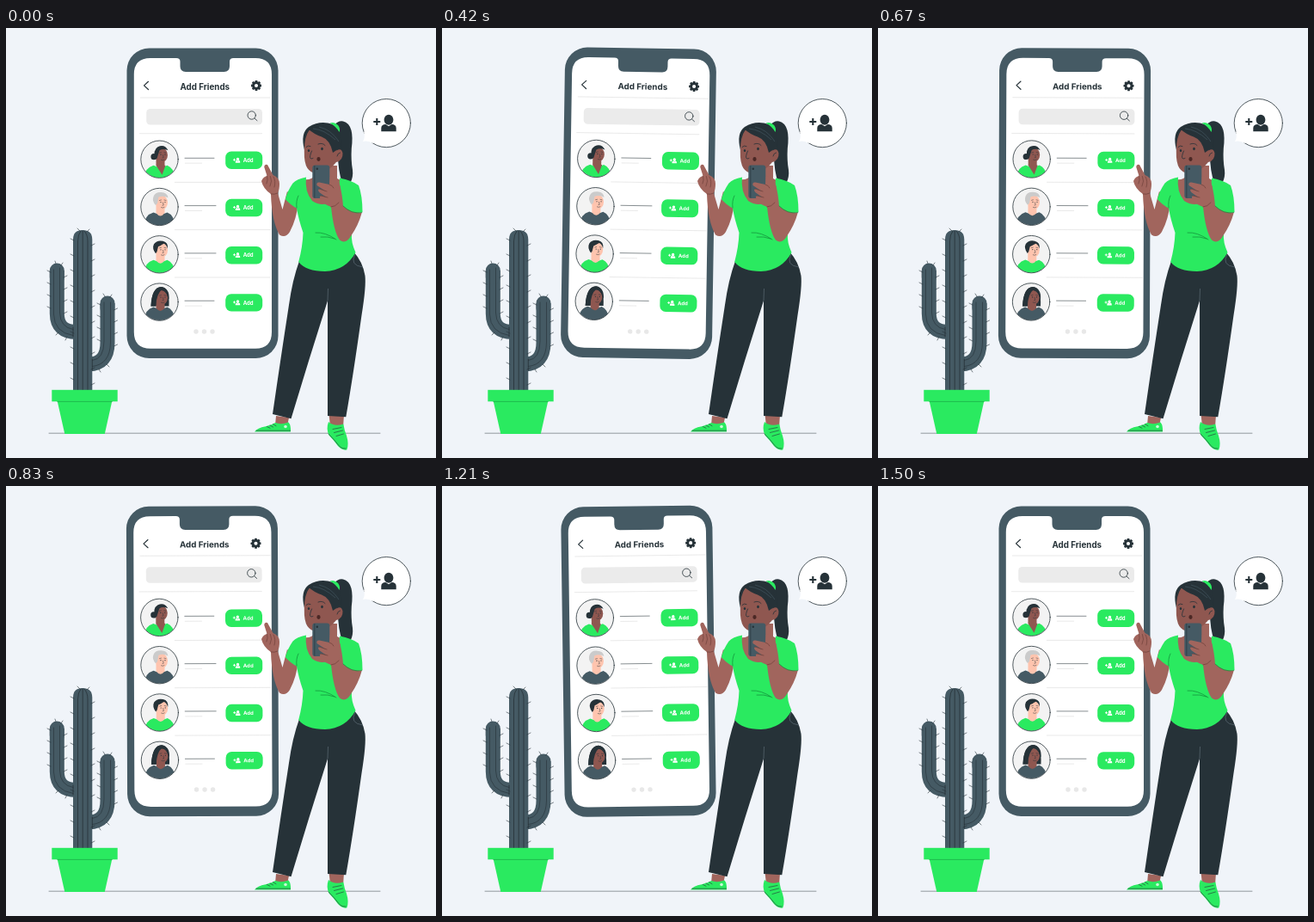
Write an HTML page that moves like this. It is 500 px wide and 500 px high and loops after 1.54 s.

```html
<!DOCTYPE html>
<html lang="en">
<head>
<meta charset="utf-8">
<title>Add Friends</title>
<style>
  html, body { margin: 0; width: 100%; height: 100%; overflow: hidden; background: #f0f4f9; }
  svg { display: block; width: 100vw; height: 100vh; }
  text { font-family: Inter, "Open Sans", sans-serif; font-weight: 700; }
  .green { fill: #2aea60; }
  .slate { fill: #455a64; }
  .dark { fill: #263238; }
  .skin { fill: #a1655d; }
  .deep { fill: #8f5750; }
  .fair { fill: #ffc4ae; }
  .ink { fill: none; stroke: #263238; stroke-width: .8; stroke-linecap: round; stroke-linejoin: round; }
  .thin { stroke-width: .6; }
  .fold { fill: none; stroke: #128a38; stroke-width: .7; stroke-linecap: round; }
  .crease { fill: none; stroke: #6f3f3a; stroke-width: .7; stroke-linecap: round; }
  .rule { stroke: #e4e4e4; stroke-width: .8; }
</style>
</head>
<body>
<svg viewBox="0 0 500 500" xmlns="http://www.w3.org/2000/svg">
  <defs>
    <clipPath id="disc"><circle r="21.4"/></clipPath>
    <g id="person">
      <ellipse cy="-4.2" rx="5.4" ry="6"/>
      <path d="M-8.7 9.3V5.500Q-8.700 1-3.500 1L0 3.200L3.500 1Q8.700 1 8.700 5.500V9.300Z"/>
    </g>
  </defs>

  <path class="ink" d="M50 471.200H435" stroke-opacity=".6"/>

  <g id="phone">
    <rect class="slate" x="140.500" y="23.500" width="176" height="360.500" rx="26"/>
    <path fill="#fff" d="M168 35H198Q202.500 35 202.500 39V44.500Q202.500 51 209 51H253.500Q260 51 260 44.500V39Q260 35 264.500 35H290Q309 35 309 54V353.500Q309 372.700 290 372.700H168Q148.800 372.700 148.800 353.500V54Q148.800 35 168 35Z"/>
    <path class="ink" style="stroke-width:1.200" d="M165.500 62.300L160.500 66.900L165.500 71.500"/>
    <text class="dark" x="231.300" y="71.500" font-size="9.800" text-anchor="middle">Add Friends</text>
    <g id="gear" class="dark" transform="translate(291 67)"></g>
    <rect x="163.200" y="94" width="134.800" height="18.600" rx="4.500" fill="#ebebeb"/>
    <circle class="ink" cx="285.700" cy="101.500" r="4.700"/>
    <path class="ink" d="M289 105L292 107.700"/>
    <g id="rows"></g>
    <g fill="#e8e8e8">
      <circle cx="221" cy="353" r="2.700"/><circle cx="230.500" cy="353" r="2.700"/><circle cx="240" cy="353" r="2.700"/>
    </g>
  </g>

  <g id="cactus">
    <path d="M59.300 282V332Q59.300 353.500 82 353.500M118 320V366Q118 390.500 96 391" fill="none" stroke="#455a64" stroke-width="17"/>
    <path d="M59.300 282V290M118 320V326" fill="none" stroke="#455a64" stroke-width="17" stroke-linecap="round"/>
    <path class="slate" d="M78 421V246Q78 235 89 235Q100.300 235 100.300 246V421Z"/>
    <path class="ink" d="M83.500 421V248Q83.500 240 87 236M89.200 421V236M95 421V248Q95 240 91 236"/>
    <path class="ink thin" d="M55.500 281V333Q56 354 78 357.500M62.500 279V331Q63 348 78 350.500M114 319V364Q114 385 100.500 386.500M121.500 319V366Q121 391 100.500 393.500"/>
    <path class="ink" d="M78 348V359M100.300 385V398"/>
    <path id="spines" class="ink thin" d=""/>
    <path class="green" d="M59.500 433H123.500L114.800 472H68.300Z"/>
    <rect class="green" x="53.300" y="420.800" width="76.400" height="13.500"/>
    <path class="fold" style="stroke-width:.5" d="M59.700 434.400H123.400"/>
  </g>

  <g id="bubble">
    <circle class="ink" style="fill:#fff" cx="442.300" cy="110.600" r="28.100"/>
    <path fill="#fff" d="M416 120.500Q418.200 127.500 414.800 132Q420 130.500 426.500 134L432 124Z"/>
    <use href="#person" class="dark" transform="translate(445 111)"/>
    <path d="M427.300 109H435.300M431.300 105V113" stroke="#263238" stroke-width="2.100"/>
  </g>

  <g id="woman">
    <path class="dark" d="M382 113Q386 107.500 392 108.500Q399 110 401.500 119Q403.500 127 401.800 140Q401 154 403 165Q404 173 400.500 180Q396 178 391 180Q386 166 386 147Z"/>

    <path class="skin" d="M314 451L329 453L327 463L313 462Z"/>
    <path class="green" d="M289 469.500Q292 465 302 463.300Q309 461.800 313 459Q320 461.500 328.500 458.500Q331.500 462 331 469.500Z"/>
    <path class="ink thin" d="M303.500 463.500L307 465.300M307 462L310.500 464M310.500 460.500L314 462.700M291 468.200H330.500"/>
    <circle cx="325" cy="463.500" r="1.800" fill="#fff" fill-opacity=".75"/>
    <path class="skin" d="M375.500 449L393 450L392 464L377 463Z"/>
    <path class="green" d="M375 458Q382 464 392.300 460.500Q393.500 468 396 474Q399 484 396.300 490.500Q391 491.500 386 486Q381 479 375.500 473.500Q372 466 375 458Z"/>
    <path class="ink thin" d="M380 466.500L390 464.500M381.500 470.500L391.500 468M384 474.500L392.500 472M375 472Q382 479 387 485.500Q390 489.500 395 489"/>

    <path class="dark" d="M341 271Q333 293 329 322Q320 380 310 449L331.500 454.300Q352 386 374 317V451L395.300 452.300Q404 402 413.500 334Q419 300 417.500 288Q415 272 404 260Z"/>
    <path d="M374 317L374.500 303M406 263Q399 276 415 278" fill="none" stroke="#65757e" stroke-width=".6"/>

    <path class="skin" d="M327 190L340 202Q338 222 330 237Q325 245 318 240.500Q309 225 308 193Q299 187 297 178Q299 173 303.500 172L300.200 161.500Q300.500 157.800 304 159L310.500 171Q318 174 318 181Q318 188 316 192L321.500 211Z"/>
    <path class="crease" d="M303.500 172Q305 177 303 181M307.500 172.500Q310 178 307 184M311 173Q314 178 312 185M308 193Q312 194 316 192"/>

    <path class="skin" d="M358 160H385V175L391 178L388 207H351L346 176Q356 177 358 172Z"/>
    <path class="green" d="M349 173.500Q338 175.500 333.500 180.500Q327 190 324.800 199Q331 206 338 209.500Q340 222 345.500 238Q345 254 340.200 272Q349 283 371 283Q395 282 406.500 261Q401 249 402 239L403 216L414.500 214Q414.500 195 410 183Q402 177 388 174.500Q388 191 380 201Q368 209 356 201Q347 190 349 173.500Z"/>
    <path class="fold" d="M338 209Q337 201 340 195M360 238Q371 237 384 246M366 243Q374 242 382 245"/>

    <path class="dark" d="M347 142Q342 122 352 115Q365 107 380 112Q391 118 391 140L389 153H374Z"/>
    <path class="deep" d="M352.500 119Q347 126 346.800 143Q346.500 157 350.500 163Q354 168.500 361 168.500Q375 168 384 156Q392 154 391.500 145.500Q390 139 384.500 142.500L384 130L362 117Z"/>
    <path class="dark" d="M351 117Q358 123.500 367 126.500Q377 130 380 145Q385 142 388.500 138Q388 117 371 111Z"/>
    <path d="M357 117Q370 118 383 130M364 115Q378 118 387 132" fill="none" stroke="#455a64" stroke-width=".6"/>
    <path class="green" d="M376.500 110.500Q382 108.500 386.500 113.500Q389 117.500 387.500 121Q384 114.500 376.500 110.500Z"/>
    <path class="ink" d="M349 138.500Q351 136 354 137.500M363 135Q368 133 371 136.500M355.500 143Q352.500 150 354 151.500Q355.500 152.500 357 151.500M385 149Q385.500 145.500 388.500 145"/>
    <ellipse class="dark" cx="352" cy="142.500" rx="1.200" ry="1.600"/>
    <ellipse class="dark" cx="367.500" cy="140.500" rx="1.300" ry="1.700"/>
    <ellipse cx="363.500" cy="152.500" rx="2.100" ry="2.400" fill="#4b2825"/>

    <path class="skin" d="M392 207Q402 216 413.800 214.500Q410 229 401 242Q395 252 388 246.500Q381 237 378 208Q367 204 365 198L376 172Q386 174 388.500 184Q391 194 392 207Z"/>
    <rect x="356.300" y="159.500" width="20" height="38.500" rx="3" class="slate"/>
    <path d="M358.800 160V197.500" stroke="#263238" stroke-width=".6"/>
    <circle class="dark" cx="361.800" cy="163.800" r="1.200"/>
    <path class="skin" d="M377 171.500Q387 174 388.500 184Q390 194 386 204L378 208Q371 203 366 199Q363.500 196 366.500 195L373 197Q368 194 364.300 191Q361.500 187.500 365 187L372 190L361.500 183Q360.500 179 364.500 179.500L376 182Z"/>
    <path class="crease" d="M364 187L373 190M366 195L374 197M376 182Q380 183 381 186M378 208Q383 208 387 203"/>
    <path class="fold" d="M392 207Q402 217 413.800 214.500"/>
  </g>
</svg>
<script>
const $ = id => document.getElementById(id);
const CYCLE = 1540, SWAY = 1500;

// Avatars are drawn around the centre of their disc
const bust = (cls, top) =>
  `<path class="${cls}" d="M-18 24Q-18 ${top + 3} -7 ${top}L1 ${top + 3}L9 ${top}Q17 ${top + 3} 19 24Z"/>`;
const head = cls =>
  `<path class="${cls}" d="M-4 -2V7Q1 14 6 7V2Z"/><ellipse class="${cls}" cx="2.500" cy="-5" rx="7" ry="8.500"/>`;
const face =
  '<path class="ink" style="stroke-width:.5" d="M0 -7.500L2 -8M5.500 -8L7.500 -7.500M4 -5L4.700 -2L3.500 -1.700M2 .700Q4 1.700 5.500 .500"/>' +
  '<circle class="dark" cx="1.500" cy="-5.500" r=".6"/><circle class="dark" cx="6.500" cy="-5.500" r=".6"/>';

const avatars = [
  '<circle class="dark" cx="-6.500" cy="-3" r="3.600"/>' + bust('green', 7) + head('deep') +
    '<path class="deep" d="M-4 7L3 18L7 7Z"/><path class="dark" d="M-5 0Q-8 -11 -2 -14.500Q6 -18 10 -10.500Q4 -13 0 -10.500Q-1.500 -6 -3 -1Z"/>' + face,
  bust('slate', 6.500) + head('fair') +
    '<path fill="#cbcbcb" d="M-4.500 -2Q-9 -7 -7 -12Q-5 -17.500 2 -17Q9 -17 10 -10.500Q5 -13.500 -1 -11.500L-2.500 -4Z"/>' + face,
  bust('green', 6.500) + head('fair') +
    '<path class="dark" d="M-4.500 -1Q-9 -7 -6.500 -12Q-3 -17 4 -15.500Q10.500 -14 9.500 -6.500Q8 -11.500 5 -12.500Q0 -9.500 -1.500 -9L-3 -3Z"/>' + face,
  '<path class="dark" d="M-10 5Q-9 -17 2 -17.500Q12 -17 11 5Z"/>' + bust('slate', 6) + head('deep') +
    '<path class="dark" d="M-10 5Q-9 -17 2 -17.500Q12 -16 11 -3L9.500 -6Q7 -13.500 2 -13.500Q-3 -10 -4.500 5Z"/>' + face
];

const rule = (y, x1, x2) => `<path class="rule" d="M${x1} ${y}H${x2}"/>`;
const nameEnds = [242, 244, 244, 242];

function row(art, i) {
  const y = 152.7 + 55.3 * i, by = 153.8 + 55.2 * i, ly = 151.3 + 55.3 * i;
  return `<g transform="translate(178.500 ${y})">
      <circle r="21.700" fill="#f3f3f3"/><g clip-path="url(#disc)">${art}</g><circle class="ink" r="21.700"/>
    </g>
    <path class="ink" style="stroke-width:.55" d="M208 ${ly}H${nameEnds[i]}"/>
    ${rule(ly + 5.9, 208, 228)}
    <rect class="green" x="255.200" y="${by - 10.2}" width="43" height="20.400" rx="6.800"/>
    <path d="M264 ${by - .5}h3M265.500 ${by - 2}v3" stroke="#fff" stroke-width=".9"/>
    <use href="#person" fill="#fff" transform="translate(269.500 ${by}) scale(.31)"/>
    <text x="281.700" y="${by + 2.1}" font-size="6" fill="#fff" text-anchor="middle">Add</text>`;
}

$('rows').innerHTML = rule(81, 156, 308) + rule(122.7, 155, 298) +
  [179.4, 234.6, 290].map(y => rule(y, 196, 308)).join('') + avatars.map(row).join('');

$('gear').innerHTML =
  '<circle r="3.400" fill="none" stroke="#263238" stroke-width="2.700"/>' +
  Array.from({ length: 8 }, (_, i) =>
    `<rect x="-1.400" y="-6" width="2.800" height="2.600" rx=".6" transform="rotate(${i * 45})"/>`).join('');

// Pairs of short thorns along both edges of an upright stem
const thorns = (left, right, from, to, step) => {
  let d = '';
  for (let y = from; y < to; y += step)
    d += `M${left + 1} ${y}l-4 -2M${right - 1} ${y + 6}l4 -2`;
  return d;
};
$('spines').setAttribute('d',
  thorns(78, 100, 247, 412, 18) + thorns(51, 68, 284, 340, 14) + thorns(109, 126.5, 322, 375, 14) +
  'M86 236l-3 -3M94 237l3 -3M58 274l-1 -3M64 276l2 -3M115 312l-2 -3M121 313l2 -3M61 354l-3 3M71 359l-2 4M117 391l3 3M108 397l2 3');

// Linear sway: 0 to 1 degree, to -1 degree, back to 0
function angle(t) {
  const p = Math.min(t / SWAY, 1);
  return p < .25 ? 4 * p : p < .75 ? 2 - 4 * p : 4 * p - 4;
}

let start;
function draw(now) {
  start ??= now;
  $('phone').setAttribute('transform', `rotate(${angle((now - start) % CYCLE)} 228.500 203.800)`);
  requestAnimationFrame(draw);
}
requestAnimationFrame(draw);
</script>
</body>
</html>
```
